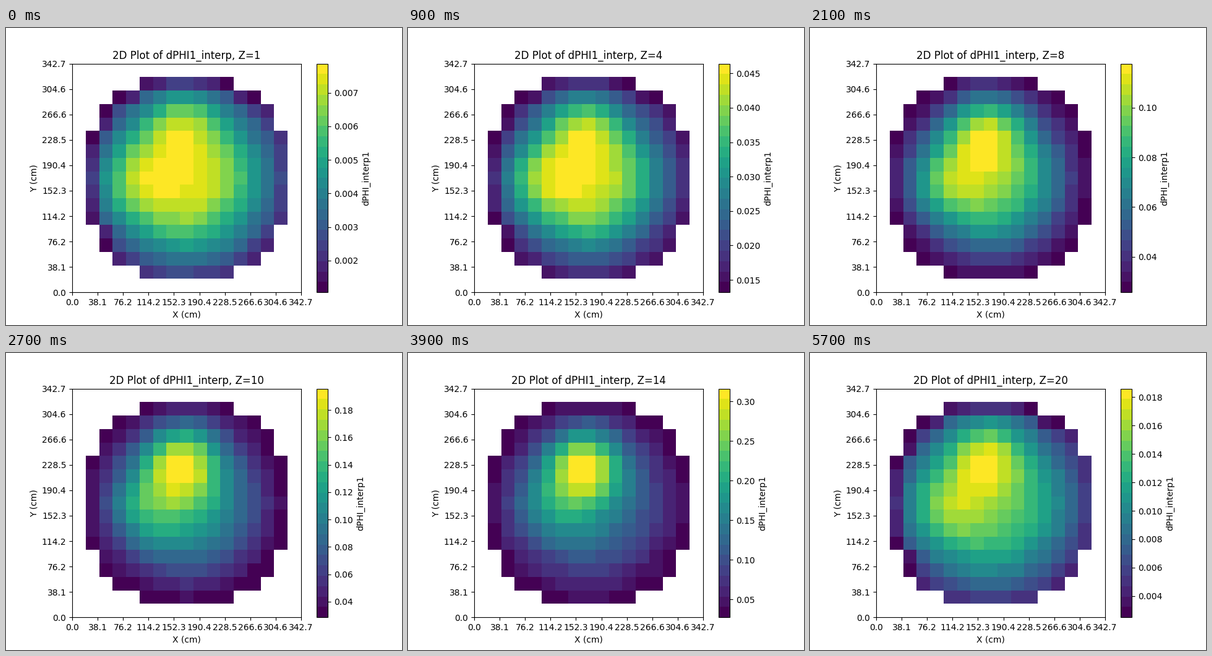
Animation of 640x480 px, one loop 6 s. Source, as a matplotlib script:

```python
import numpy as np
import matplotlib.pyplot as plt
from matplotlib.animation import FuncAnimation

SIZE = 342.72
N = 17
LAYERS = 20

# Colour range at a few layers; the rest is eased between them
KEY_Z = [1, 4, 5, 8, 11, 12, 13, 14, 17, 20]
LOW = [.00105, .0132, .0166, .0257, .030, .0305, .0295, .0275, .018, .0025]
HIGH = [.00787, .0464, .063, .1177, .242, .3285, .345, .316, .1222, .0186]

# Cell coordinates from the centre of the core, y upwards
row, col = np.mgrid[:N, :N]
x, y = col - N // 2, row - N // 2
radius = np.hypot(x, y)
core = (radius < 7.9) & (np.maximum(abs(x), abs(y)) < 8)
core &= abs(x) + abs(y) < 11 + (abs(abs(x) - abs(y)) < 3)
padded = np.pad(core, 1)
inner = padded[:-2, 1:-1] & padded[2:, 1:-1] & padded[1:-1, :-2] & padded[1:-1, 2:]
rim = core & ~inner & (y > x)


def bump(cx, cy, width):
    return np.exp(-((x - cx) ** 2 + (y - cy) ** 2) / (2 * width ** 2))


def layer(z):
    """Field of layer z with its lowest and highest value."""
    mid = np.sin(np.pi * (z - 1) / (LAYERS - 1))
    # Share of the narrow peak, strongest near layer 13
    s = .3 * (z - 1) / (LAYERS - 1) + .85 * np.exp(-((z - 12.8) / 2.6) ** 2 / 2)
    bowl = np.cos(np.pi * np.minimum(radius, 8) / 16) ** (1 + .5 * mid ** .7)
    f = (.87 - .45 * s) * bowl
    f += (.32 + .36 * s) * bump(-.35, 4 - 1.2 * s, 1.9)
    f += (.3 - .1 * s) * bump(-3.7 + .7 * s, -.2, 2)
    f += .1 * max(1 - 2 * s, 0) * (bump(2.7, 0, 1.6) + bump(0, -3.2, 1.7))
    f -= .13 * (1 - mid) * rim
    f = np.ma.array(f, mask=~core)
    f = (f - f.min()) / (f.max() - f.min())
    low = np.interp(z, KEY_Z, LOW)
    high = np.interp(z, KEY_Z, np.sqrt(HIGH)) ** 2
    return low + f * (high - low), low, high


fig, ax = plt.subplots(figsize=(6.4, 4.8), dpi=100)
edges = np.linspace(0, SIZE, N + 1)
mesh = ax.pcolormesh(edges, edges, layer(1)[0], cmap=plt.get_cmap("viridis", 22))
ax.set_aspect("equal")
bar = fig.colorbar(mesh, ax=ax)
bar.set_label("dPHI_interp1")
ticks = np.linspace(0, SIZE, 10)
labels = [f"{v:.1f}" for v in ticks]
ax.set_xticks(ticks, labels)
ax.set_yticks(ticks, labels)
ax.set_xlabel("X (cm)")
ax.set_ylabel("Y (cm)")


def draw(i):
    field, low, high = layer(i + 1)
    mesh.set_array(field)
    mesh.set_clim(low, high)
    ax.set_title(f"2D Plot of dPHI1_interp, Z={i + 1}")
    return [mesh]


anim = FuncAnimation(fig, draw, frames=LAYERS, interval=300, repeat=True,
                     repeat_delay=0, init_func=lambda: draw(0), blit=False)
plt.show()
```
